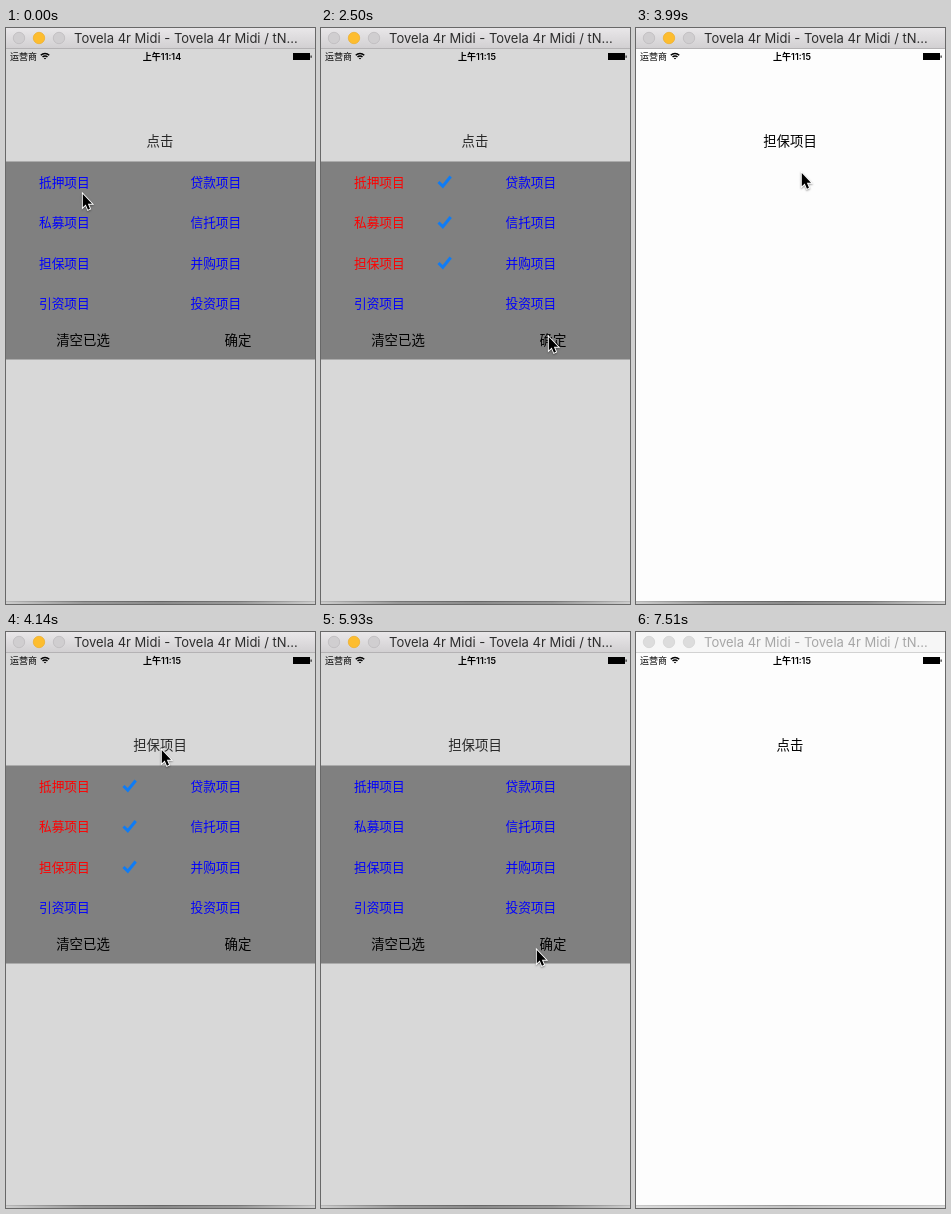
An HTML page with a canvas that plays this animation: 309x576 px, repeating every 7.53 s.

```html
<!DOCTYPE html>
<html lang="zh">
<head>
<meta charset="utf-8">
<style>
  html, body { margin: 0; height: 100%; overflow: hidden; background: #fdfdfd; }
  canvas { display: block; }
</style>
</head>
<body>
<canvas id="stage" width="309" height="576"></canvas>
<script>
const ctx = document.getElementById('stage').getContext('2d');
const LOOP = 7530, STEP = 150;
const CJK = '"Noto Sans CJK SC", "Noto Sans CJK", sans-serif';
const LATIN = 'Inter, Roboto, sans-serif';
const rows = [['抵押项目', '贷款项目'], ['私募项目', '信托项目'],
              ['担保项目', '并购项目'], ['引资项目', '投资项目']];
const picked = [440, 1030, 1470], cleared = 5180;

// Pointer moves: start, number of steps, end x, end y
const moves = [
  [140, 1, 67, 157], [580, 2, 67, 188], [1180, 2, 68, 230], [1610, 4, 203, 303],
  [2200, 3, 227, 308], [3240, 7, 155, 117], [4430, 3, 231, 285],
  [4880, 3, 75, 306], [5480, 4, 215, 317], [6530, 2, 228, 431]
];

function pointerAt(t) {
  let x = 76, y = 165;
  for (const [start, n, endX, endY] of moves) {
    if (t < start) break;
    const k = Math.min(1, (Math.floor((t - start) / STEP) + 1) / n);
    x += (endX - x) * k;
    y += (endY - y) * k;
  }
  return [Math.round(x), Math.round(y)];
}

function rect(x, y, w, h, fill) {
  ctx.fillStyle = fill;
  ctx.fillRect(x, y, w, h);
}

function gradient(x, y, stops) {
  const g = ctx.createLinearGradient(0, 0, x, y);
  stops.forEach((color, i) => g.addColorStop(i / (stops.length - 1), color));
  return g;
}

// Text whose glyphs are centred on height y
function label(str, x, y, size, fill, align = 'left', weight = 400, family = CJK) {
  ctx.font = `${weight} ${size}px ${family}`;
  ctx.textAlign = align;
  ctx.fillStyle = fill;
  ctx.fillText(str, x, y + size * 0.36);
}

function titleBar(active) {
  rect(0, 0, 309, 20, active ? gradient(0, 20, ['#e9e7e9', '#d2d0d2']) : '#f6f6f6');
  rect(0, 20, 309, 1, active ? '#b4b2b4' : '#d2d2d2');
  for (let i = 0; i < 3; i++) {
    const lit = active && i === 1;
    ctx.beginPath();
    ctx.arc(13 + 20 * i, 10, 5.7, 0, 7);
    ctx.fillStyle = lit ? '#fdbd2f' : active ? '#d0ced0' : '#dcdcdc';
    ctx.strokeStyle = lit ? '#eeb030' : active ? '#bebcbe' : '#d4d4d4';
    ctx.lineWidth = 0.8;
    ctx.fill();
    ctx.stroke();
  }
  label('Tovela 4r Midi - Tovela 4r Midi / tN...', 68, 10, 13,
        active ? '#2c2c2c' : '#a6a6a6', 'left', 400, LATIN);
}

function statusBar(t) {
  label('运营商', 4, 28.5, 9, '#000');
  label('上午11:1' + (t < 1610 ? 4 : 5), 156, 28.5, 9, '#000', 'center', 600,
        'Inter, ' + CJK);
  ctx.strokeStyle = '#000';
  ctx.lineWidth = 1.4;
  for (const r of [1, 3.5, 6]) {
    ctx.beginPath();
    ctx.arc(39, 31.5, r, -Math.PI * 0.75, -Math.PI * 0.25);
    ctx.stroke();
  }
  rect(287, 25, 17, 7, '#000');
  rect(304.6, 27.5, 1, 2.3, '#000');
}

function check(y) {
  ctx.beginPath();
  ctx.moveTo(117.5, y);
  ctx.lineTo(121.8, y + 4.3);
  ctx.lineTo(129.7, y - 5.5);
  ctx.strokeStyle = '#0f7cf5';
  ctx.lineWidth = 3;
  ctx.stroke();
}

function panel(t) {
  rect(0, 21, 309, 552, 'rgba(128,128,128,.3)');
  rect(0, 133.5, 309, 198, '#808080');
  rows.forEach(([left, right], i) => {
    const y = 154 + 40.5 * i;
    const on = t >= picked[i] && t < cleared;
    label(left, 33, y, 12.7, on ? '#f00' : '#00f');
    label(right, 184.5, y, 12.7, '#00f');
    if (on) check(y);
  });
  label('清空已选', 77, 312, 13.4, '#000', 'center');
  label('确定', 232, 312, 13.4, '#000', 'center');
}

function pointer(x, y) {
  ctx.save();
  ctx.translate(x + 0.8, y + 1);
  ctx.scale(0.92, 0.95);
  ctx.beginPath();
  for (const [px, py] of [[0, 0], [0, 14], [3.2, 11], [5.6, 16.5], [7.8, 15.5], [5.5, 10.2], [10, 10.2]])
    ctx.lineTo(px, py);
  ctx.closePath();
  ctx.shadowColor = 'rgba(0,0,0,.4)';
  ctx.shadowBlur = 2;
  ctx.shadowOffsetY = 1;
  ctx.strokeStyle = '#fff';
  ctx.lineWidth = 2;
  ctx.stroke();
  ctx.shadowColor = 'transparent';
  ctx.fillStyle = '#000';
  ctx.fill();
  ctx.restore();
}

function draw(t) {
  const active = t < 7510;
  const open = t < 3100 || (t >= 4140 && t < 6230);
  rect(0, 0, 309, 576, '#fdfdfd');
  label(t >= 3100 && t < 6230 ? '担保项目' : '点击', 154, 112.7, 13.4, '#000', 'center');
  if (open) panel(t);
  statusBar(t);
  titleBar(active);
  const edge = active ? ['#b8b8b8', '#777', '#666', '#777', '#b8b8b8'] : ['#c8c8c8', '#999', '#c8c8c8'];
  const shade = active ? ['#ccc', '#999', '#8c8c8c', '#999', '#ccc'] : ['#dadada', '#c4c4c4', '#dadada'];
  rect(0, 573, 309, 1, gradient(309, 0, edge));
  rect(0, 574, 309, 2, gradient(309, 0, shade));
  if (active) pointer(...pointerAt(t));
}

const begin = performance.now();
function frame() {
  draw((performance.now() - begin) % LOOP);
  requestAnimationFrame(frame);
}
frame();
</script>
</body>
</html>
```
